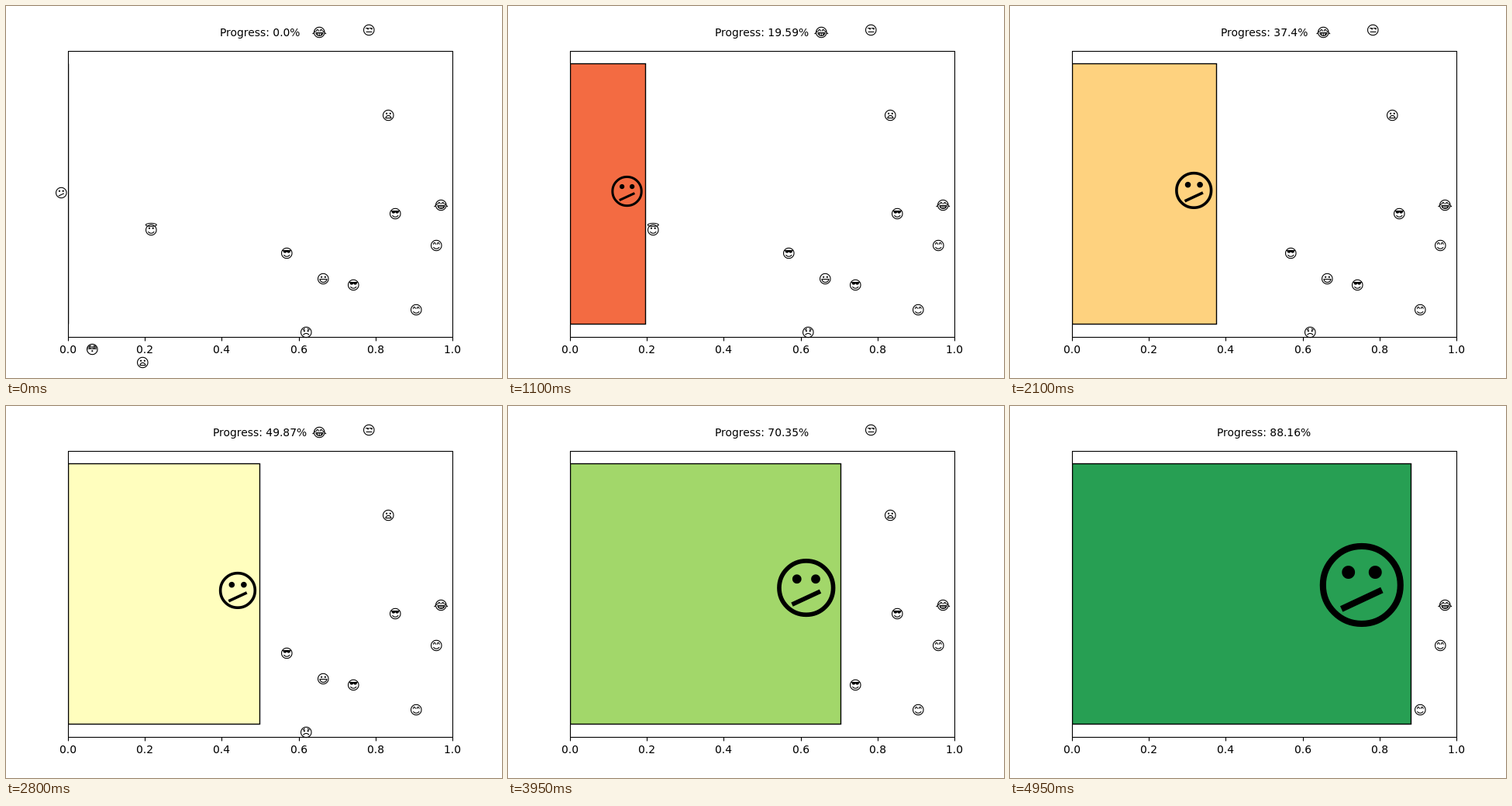
An HTML page with a canvas that plays this animation: 640x480 px, repeating every 5 s.

```html
<!DOCTYPE html>
<html>
<head>
<meta charset="utf-8">
<style>
  html, body { margin: 0; overflow: hidden; background: #fff; }
  canvas { display: block; }
</style>
</head>
<body>
<canvas id="stage" width="640" height="480"></canvas>
<script>
const ctx = document.getElementById('stage').getContext('2d');
const PT = 100 / 72, FONT = '"DejaVu Sans", sans-serif';
const HERO = '😕', FACE_SIZE = 12, HALF_ADVANCE = 0.518;
const LEFT = 80, WIDTH = 496, STEPS = 100, STEP_MS = 50, RATE = 0.8905;
const RAMP = ['a50026', 'd73027', 'f46d43', 'fdae61', 'fee08b', 'ffffbf',
  'd9ef8b', 'a6d96a', '66bd63', '1a9850', '006837']
  .map(hex => [0, 2, 4].map(i => parseInt(hex.slice(i, i + 2), 16)));

// face, centre x, centre y, points the hero grows by when it is reached
const FACES = [
  ['😳', 111.5, 442.5, 8.7], ['😦', 176.5, 459.5, 12.5], ['😇', 187.5, 288.5, 6.5],
  ['😎', 362.5, 318.5, 8], ['😞', 387.5, 420.5, 4.7], ['😂', 403.5, 33.5, 4.7],
  ['😃', 409.5, 351.5, 4.7], ['😎', 448.5, 359.5, 6.75], ['😒', 468.5, 30.5, 6.75],
  ['😦', 493.5, 140.5, 6.75], ['😎', 502.5, 267.5, 6.75], ['😊', 529.5, 391.5, 7],
  ['😊', 555.5, 308.5, 7], ['😂', 560.5, 256.5, 7]
];

function setFont(points) {
  ctx.font = points * PT + 'px ' + FONT;
}

// Centred text that starts on a whole pixel.
function label(string, x, y) {
  ctx.fillStyle = '#000';
  ctx.fillText(string, Math.round(x - ctx.measureText(string).width / 2), y);
}

// Places the round outline of a face on its centre.
function face(char, x, y, points) {
  setFont(points);
  const box = ctx.measureText(HERO + '\uFE0E');
  ctx.fillStyle = '#000';
  ctx.fillText(char + '\uFE0E', x - HALF_ADVANCE * points * PT,
    y + (box.actualBoundingBoxAscent - box.actualBoundingBoxDescent) / 2);
}

function rampColor(value) {
  const pos = Math.floor(value * 256) / 255 * 10, i = Math.floor(pos);
  return `rgb(${RAMP[i].map((c, k) => Math.round(c + (RAMP[i + 1][k] - c) * (pos - i)))})`;
}

function drawBar(value, edge) {
  const w = Math.round(edge) - LEFT;
  ctx.save();
  ctx.beginPath();
  ctx.rect(LEFT, 58, WIDTH, 369);
  ctx.clip();
  ctx.fillStyle = rampColor(value);
  ctx.fillRect(LEFT + 0.5, 74.5, w, 336);
  ctx.lineWidth = PT;
  ctx.strokeRect(LEFT + 0.5, 74.5, w, 336);
  ctx.restore();
}

function drawAxes() {
  ctx.lineWidth = 0.8 * PT;
  ctx.strokeRect(LEFT + 0.5, 58.5, WIDTH, 369);
  setFont(10);
  for (let i = 0; i <= 5; i++) {
    const x = LEFT + WIDTH * i / 5;
    ctx.beginPath();
    ctx.moveTo(Math.round(x) + 0.5, 427.5);
    ctx.lineTo(Math.round(x) + 0.5, 432.4);
    ctx.stroke();
    label((i / 5).toFixed(1), x, 448);
  }
}

function draw(step) {
  const percent = Math.round(step * RATE * 100) / 100;
  const value = step * RATE / 100, edge = LEFT + WIDTH * value;
  ctx.fillStyle = '#fff';
  ctx.fillRect(0, 0, 640, 480);
  ctx.strokeStyle = '#000';
  drawBar(value, edge);
  drawAxes();
  label(`Progress: ${Number.isInteger(percent) ? percent.toFixed(1) : percent}%`, 328, 39);

  let size = FACE_SIZE;
  for (const [char, x, y, growth] of FACES) {
    if (x - HALF_ADVANCE * FACE_SIZE * PT <= edge) size += growth;
    else face(char, x, y, FACE_SIZE);
  }
  const px = size * PT;
  face(HERO, edge - HALF_ADVANCE * px, 242.8 - 0.092 * px, size);
}

function tick() {
  draw(Math.floor(performance.now() / STEP_MS) % STEPS);
  requestAnimationFrame(tick);
}
tick();
</script>
</body>
</html>
```
